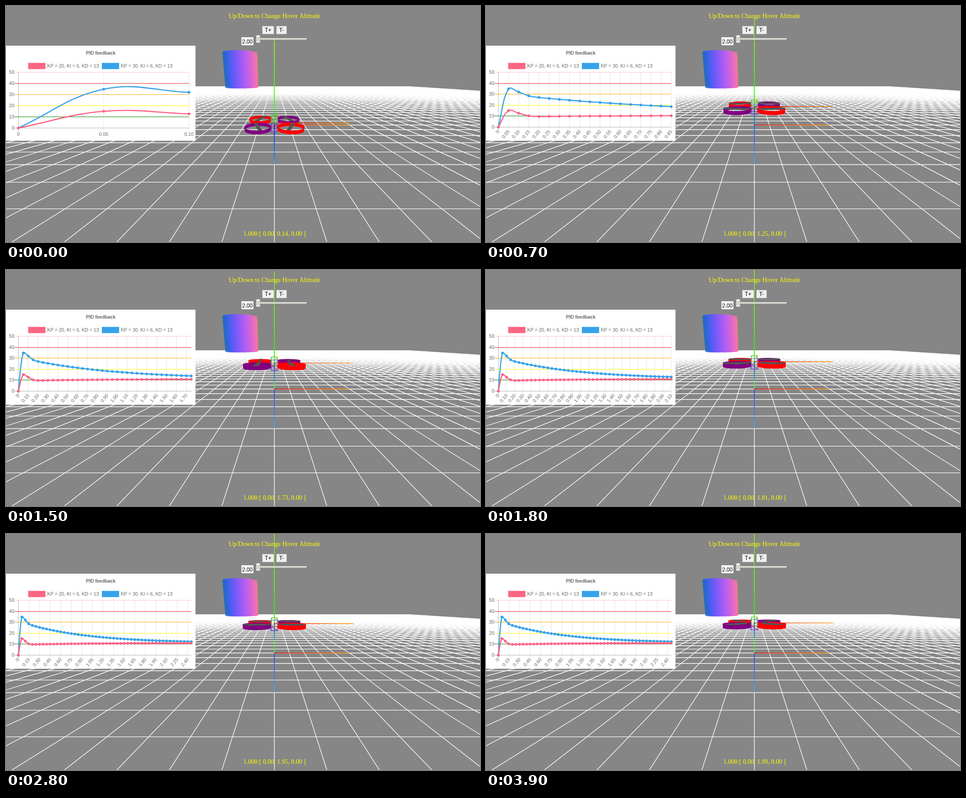
Write an HTML page with a canvas that moves like this. It is 1058 by 529 pixels and loops after 4 s.

```html
<!DOCTYPE html>
<html lang="en">
<head>
<meta charset="utf-8">
<title>Drone hover</title>
<style>
html, body { margin: 0; width: 100%; height: 100%; overflow: hidden; background: #868686; }
canvas { display: block; }
</style>
</head>
<body>
<canvas id="stage" width="1058" height="529"></canvas>
<script>
const g = document.getElementById('stage').getContext('2d');
const SANS = '"Liberation Sans", Arial, sans-serif';
const SERIF = '"Liberation Serif", "Times New Roman", serif';

// Camera at (0, 3, 10) looking at the origin
const CX = 599, CY = 266.7, FOCAL = 349;
const COS = 10 / Math.hypot(3, 10), SIN = 3 / Math.hypot(3, 10);

function project([x, y, z]) {
  const up = y - 3, far = 10 - z;
  const depth = far * COS - up * SIN;
  return [CX + FOCAL * x / depth, CY - FOCAL * (up * COS + far * SIN) / depth];
}

// Colour of a surface by its normal in view space
function normalColor([x, y, z]) {
  const view = [x, y * COS - z * SIN, y * SIN + z * COS];
  return `rgb(${view.map(v => Math.round(127.5 + 127.5 * v))})`;
}

function poly(points, color) {
  g.beginPath();
  points.forEach(p => g.lineTo(...project(p)));
  g.closePath();
  g.fillStyle = color;
  g.fill();
}

function rect(x, y, w, h, color) {
  g.fillStyle = color;
  g.fillRect(x, y, w, h);
}

function line(x1, y1, x2, y2, color, width = 1) {
  g.beginPath();
  g.moveTo(x1, y1);
  g.lineTo(x2, y2);
  g.strokeStyle = color;
  g.lineWidth = width;
  g.stroke();
}

function text(str, x, y, font, color, align = 'center') {
  g.font = font;
  g.fillStyle = color;
  g.textAlign = align;
  g.textBaseline = 'alphabetic';
  g.fillText(str, x, y);
}

function grid() {
  for (let i = -50; i <= 50; i++) {
    line(...project([i, 0, -50]), ...project([i, 0, 8.5]), '#fff', 1.4);
    if (i < 9) line(...project([-50, 0, i]), ...project([50, 0, i]), '#fff', 1.4);
  }
}

function axes(y) {
  const start = project([0, y, 0]);
  const arms = [
    [[5, y, 0], '#f00', '#f90'],
    [[0, y + 5, 0], '#0f0', '#9f0'],
    [[0, y, 5], '#00f', '#09f']
  ];
  for (const [tip, from, to] of arms) {
    const end = project(tip);
    const fade = g.createLinearGradient(...start, ...end);
    fade.addColorStop(0, from);
    fade.addColorStop(1, to);
    line(...start, ...end, fade, 1.4);
  }
}

function cylinder() {
  const n = 96, top = 4.42, bottom = 2.45;
  for (let i = 0; i < n; i++) {
    const at = k => [Math.sin(k * 2 * Math.PI / n), Math.cos(k * 2 * Math.PI / n)];
    const [nx, nz] = at(i + 0.5);
    // Facets turned to the camera only
    if (nx * (2 - nx) + nz * (10 - nz) < 0) continue;
    const [ax, az] = at(i - 0.1), [bx, bz] = at(i + 1.1);
    poly([[ax - 2, top, az], [bx - 2, top, bz], [bx - 2, bottom, bz], [ax - 2, bottom, az]],
      normalColor([nx, 0, nz]));
  }
}

function body(y) {
  const size = [0.2, 0.3, 1];
  // Each face: normal axis, side, and the two axes across it
  const faces = [[0, 1, 2, 1], [0, -1, 2, 1], [1, 1, 0, 2], [1, -1, 0, 2], [2, -1, 0, 1], [2, 1, 0, 1]];
  for (const [axis, side, u, v] of faces) {
    const corner = (a, b) => {
      const p = [0, 0, 0];
      p[axis] = side * size[axis];
      p[u] = a * size[u];
      p[v] = b * size[v];
      p[1] += y;
      return project(p);
    };
    const normal = [0, 0, 0];
    normal[axis] = side;
    g.beginPath();
    [[-1, -1], [1, -1], [1, 1], [-1, 1], [-1, -1], [1, 1]].forEach(c => g.lineTo(...corner(...c)));
    g.strokeStyle = normalColor(normal);
    g.lineWidth = 1;
    g.stroke();
  }
}

function rotor(x, y, z, angle, color) {
  const R = 0.8, H = 0.11, steps = 32;
  const half = side => {
    const arc = h => Array.from({ length: steps + 1 }, (_, k) => {
      const a = Math.PI * k / steps;
      return [x + R * Math.cos(a), y + h, z + side * R * Math.sin(a)];
    });
    poly([...arc(H), ...arc(-H).reverse()], color);
  };
  half(-1);
  const s = Math.sin(angle), c = Math.cos(angle);
  const tip = (l, w, h) => [x - l * s + w * c, y + 0.08 + h, z - l * c - w * s];
  const L = 0.75, W = 0.09, T = 0.04;
  const ring = [[L, W], [L, -W], [-L, -W], [-L, W]];
  for (const h of [-T, T]) poly(ring.map(p => tip(...p, h)), '#555');
  ring.forEach((p, k) => {
    const q = ring[(k + 1) % 4];
    poly([tip(...p, -T), tip(...q, -T), tip(...q, T), tip(...p, T)], '#555');
  });
  half(1);
}

function drone(y, spin) {
  const pair = z => {
    const left = z > 0 ? 1 : -1;
    for (const x of [-1, 1]) {
      const dir = x < 0 ? left : -left;
      rotor(x, y - 0.04, z, dir * spin, dir > 0 ? '#800080' : '#f00');
    }
  };
  pair(-1);
  axes(y);
  body(y);
  pair(1);
}

function controls() {
  text('Up/Down to Change Hover Altitude', 599, 27, '14px ' + SERIF, '#ff0');
  for (const [x, w, label] of [[571.5, 27, 'T+'], [603, 24, 'T-']]) {
    rect(x, 44.5, w, 19, '#aaa');
    rect(x + 1, 45.5, w - 2, 17, '#f0f0f0');
    text(label, x + w / 2, 58, '12px ' + SANS, '#000');
  }
  rect(559, 72, 112, 3.5, '#dfddd6');
  rect(558, 65, 9.5, 18, '#aaa69c');
  rect(559, 66, 7.5, 16, '#eeece6');
  for (let y = 71; y <= 77; y += 3) rect(560.5, y, 4.5, 1, '#99958c');
  rect(525.5, 70, 26.5, 18, '#fff');
  text('2.00', 538.7, 83.5, '12px ' + SANS, '#000');
}

const HIGH = [0, 34.8, 32, 28.5], LOW = [0, 15, 12.7, 10.3];
const high = i => HIGH[i] ?? 11 + 16 * Math.exp(-0.056 * (i - 4));
const low = i => LOW[i] ?? 11 - 1.3 * Math.exp(-0.06 * (i - 4));

function curve(pts, color, top, bottom) {
  const clamp = y => Math.max(top, Math.min(bottom, y));
  const controls = pts.map((p, i) => {
    const a = pts[Math.max(i - 1, 0)], b = pts[Math.min(i + 1, pts.length - 1)];
    const da = Math.hypot(p[0] - a[0], p[1] - a[1]), db = Math.hypot(b[0] - p[0], b[1] - p[1]);
    const ka = 0.4 * da / (da + db), kb = 0.4 * db / (da + db);
    const dx = b[0] - a[0], dy = b[1] - a[1];
    return [p[0] - ka * dx, clamp(p[1] - ka * dy), p[0] + kb * dx, clamp(p[1] + kb * dy)];
  });
  g.beginPath();
  g.moveTo(...pts[0]);
  for (let i = 1; i < pts.length; i++)
    g.bezierCurveTo(...controls[i - 1].slice(2), ...controls[i].slice(0, 2), ...pts[i]);
  g.strokeStyle = color;
  g.lineWidth = 2.6;
  g.stroke();
  g.fillStyle = color;
  for (const [x, y] of pts) {
    g.beginPath();
    g.arc(x, y, 3, 0, 7);
    g.fill();
  }
}

function chart(count) {
  const font = '10.5px ' + SANS, gray = '#666', pink = '#ff6384', blue = '#36a2eb';
  const tilted = count > 15;
  const left = 27.5, right = tilted ? 413.5 : 408.5, top = 148.5, bottom = tilted ? 271.5 : 273.5;
  const px = i => left + (right - left) * i / (count - 1);
  const py = v => bottom - (bottom - top) * v / 50;

  rect(0, 89, 423, 213, '#fff');
  text('PID feedback', 211.5, 109, 'bold ' + font, gray);
  rect(49.5, 127.5, 38.5, 14, pink);
  rect(214, 127.5, 38.5, 14, blue);
  text('KP = 20, KI = 6, KD = 13', 92, 138, font, gray, 'left');
  text('KP = 30, KI = 6, KD = 13', 256.5, 138, font, gray, 'left');

  const skip = 1 + Math.floor(count / 23);
  for (let i = 0; i < count; i += skip) {
    const x = px(i), label = i ? (i * 0.05).toFixed(2) : '0';
    line(x, top, x, bottom + 8, i ? '#e4e4e4' : '#b8b8b8');
    if (!tilted) {
      text(label, x, 291, font, gray);
      continue;
    }
    g.save();
    g.translate(x, bottom + 8);
    g.rotate(-50 * Math.PI / 180);
    text(label, 0, 3.7, font, gray, 'right');
    g.restore();
  }
  ['#b0b0b0', 'green', 'yellow', 'orange', '#d22', 'pink'].forEach((color, k) => {
    const y = Math.floor(py(k * 10)) + 0.5;
    line(19, y, right, y, color);
    text(k * 10, 18.5, y + 3.7, font, gray, 'right');
  });
  const points = f => Array.from({ length: count }, (_, i) => [px(i), py(f(i))]);
  curve(points(high), blue, top, bottom);
  curve(points(low), pink, top, bottom);
}

function draw(step) {
  const t = step / 10;
  const altitude = 2 - 1.8455 * Math.exp(-1.277 * t) - 0.01 * Math.exp(-9 * t);
  const spin = (17 + 34.2 * step + 0.03 * step * step) * Math.PI / 180;
  rect(0, 0, 1058, 529, '#868686');
  grid();
  cylinder();
  axes(0);
  drone(altitude, spin);
  controls();
  text(`1.000:[ 0.00, ${altitude.toFixed(2)}, 0.00 ]`, 599.5, 515, '14px ' + SERIF, '#ff0');
  chart(Math.min(50, Math.floor(3 + 2.23 * step)));
}

let shown = -1;
const begin = performance.now();
function tick() {
  const step = Math.floor((performance.now() - begin) / 100) % 40;
  if (step !== shown) draw(shown = step);
  requestAnimationFrame(tick);
}
tick();
</script>
</body>
</html>
```
